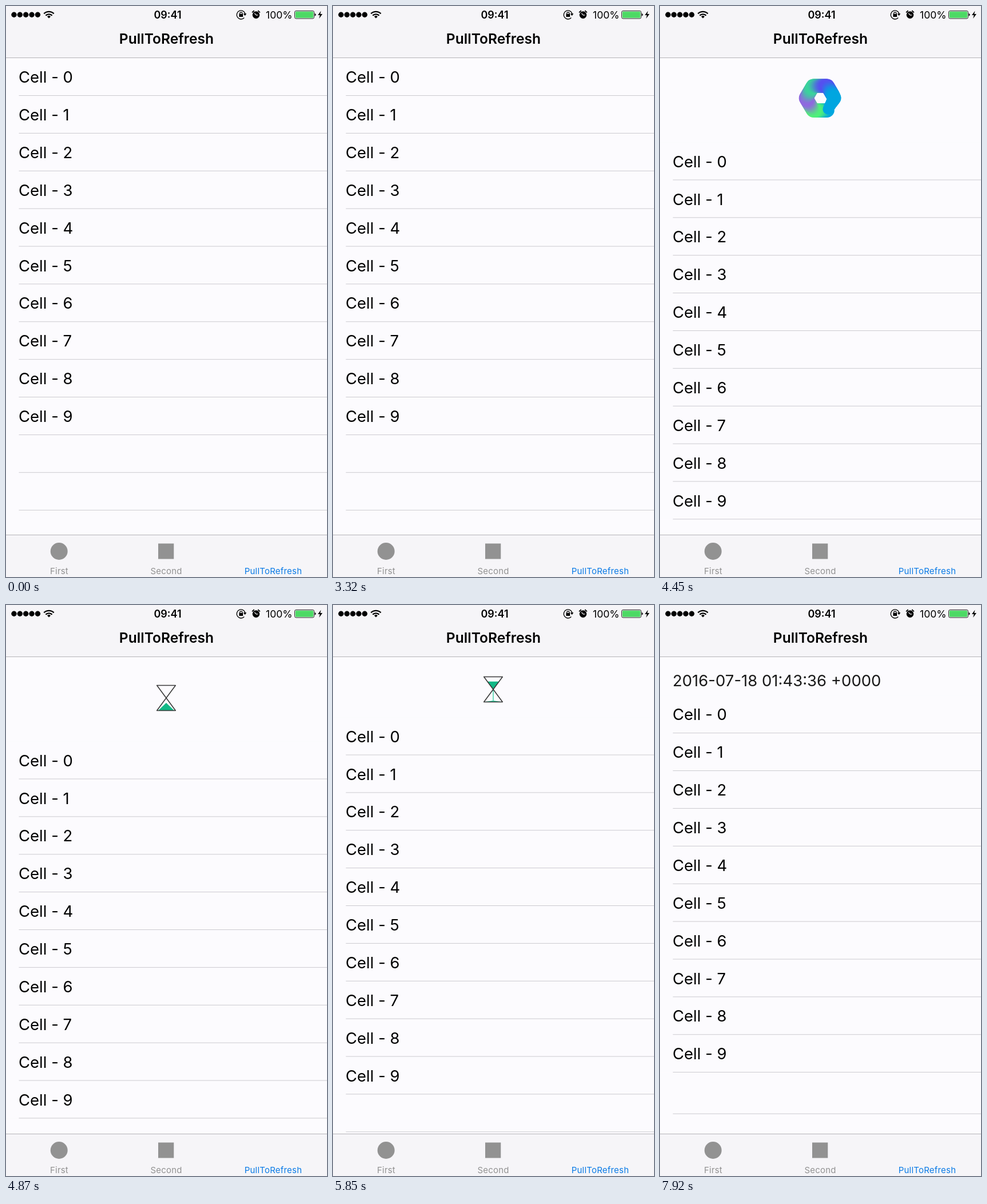
An HTML page for the animation above (8000 ms loop, 561 by 998 pixels).

```html
<!DOCTYPE html>
<html lang="en">
<head>
<meta charset="utf-8">
<title>PullToRefresh</title>
<style>
  html, body { margin: 0; width: 100%; height: 100%; overflow: hidden; background: #fcfbfe; }
  svg { display: block; width: 100vw; height: 100vh; font-family: Inter, Roboto, sans-serif; }
  .cell { font-size: 27.5px; }
  .sep { stroke: #cbcacf; stroke-width: 1; }
  .edge { stroke: #b5b4b8; stroke-width: 1; }
  .tab { font-size: 15px; letter-spacing: .2px; text-anchor: middle; fill: #929292; }
</style>
</head>
<body>
<svg viewBox="0 0 561 998">
  <rect width="561" height="998" fill="#fcfbfe"/>
  <g id="ribbon"></g>
  <g id="hourglass">
    <path id="sandTop" fill="#12b886"/>
    <path id="sandBottom" fill="#12b886"/>
    <path id="stream" stroke="#4fd6ae" stroke-width="1.6"/>
    <path d="M-16.3-22H16.3L-16.3 22H16.3Z" fill="none" stroke="#3a3a3a" stroke-width="1.6" stroke-linejoin="round"/>
  </g>
  <g id="blanks"></g>
  <g id="stamp">
    <text class="cell" x="22" y="134.2">2016-07-18 01:43:36 +0000</text>
    <line class="sep" x1="22.5" x2="561" y1="156.5" y2="156.5"/>
  </g>
  <g id="cells"><rect y="91" width="561" height="659" fill="#fcfbfe"/></g>

  <rect width="561" height="90.5" fill="#f6f5f8"/>
  <line class="edge" x2="561" y1="90.5" y2="90.5"/>
  <g id="signal"></g>
  <g fill="none" stroke="#000" stroke-width="2.3">
    <path d="M66.3 13.4a12.4 12.4 0 0 1 17.4 0M69.4 16.6a8 8 0 0 1 11.2 0"/>
    <path d="M72 18.4a4.3 4.3 0 0 1 6 0L75 21.4Z" fill="#000" stroke="none"/>
  </g>
  <text x="282.5" y="21.7" font-size="18" font-weight="600" text-anchor="middle">09:41</text>
  <g fill="none" stroke="#000" stroke-width="1.4">
    <path d="M416.3 20.5A7.5 7.5 0 1 1 418 13.5"/>
    <path d="M414.8 13.2h5.6l-2.8 4Z" fill="#000" stroke="none"/>
    <path d="M408.8 14.5v-1.6a2 2 0 0 1 4 0v1.6"/>
    <rect x="407.4" y="14" width="6.8" height="5" fill="#000" stroke="none"/>
  </g>
  <circle cx="437" cy="15.6" r="6.3"/>
  <path d="M430.6 10.8l2.6-2.3M443.4 10.8l-2.6-2.3" stroke="#000" stroke-width="1.8" stroke-linecap="round"/>
  <path d="M437 15.8h3.2M437 15.8l-2.6-3.2" fill="none" stroke="#f6f5f8" stroke-width="1.2"/>
  <text x="454" y="21.7" font-size="17.6">100%</text>
  <rect x="504.5" y="8.5" width="34" height="13.5" rx="2.4" fill="#f6f5f8" stroke="#222" stroke-width="1"/>
  <rect x="505.8" y="9.8" width="31.4" height="10.9" rx="1.2" fill="#4cd964"/>
  <path d="M539.6 12.8q2 .6 2 2.4t-2 2.4Z"/>
  <path d="M550.5 8.5L545 16h3.6l-1.4 6L553 14h-3.8Z"/>
  <text x="280.5" y="66" font-size="24.6" font-weight="600" text-anchor="middle">PullToRefresh</text>

  <rect y="924.5" width="561" height="73.5" fill="#f6f5f8"/>
  <line class="edge" x2="561" y1="924.5" y2="924.5"/>
  <circle cx="92.7" cy="953" r="15" fill="#929292"/>
  <rect x="266" y="939.5" width="27.3" height="27" fill="#929292"/>
  <text class="tab" x="93" y="993">First</text>
  <text class="tab" x="280" y="993">Second</text>
  <text class="tab" x="467" y="993" style="fill:#0b7be6">PullToRefresh</text>
</svg>
<script>
const LOOP = 8000, ROW = 65.88, REST = 105.5, PEAK = 147.5;
const PULL = 3670, HELD = 4465, RELEASE = 4900, SETTLED = 5250;
const CLOSE = 7190, CLOSE_TIME = 880, INSERT = CLOSE + 25;

const byId = id => document.getElementById(id);
const clamp = v => Math.min(1, Math.max(0, v));
const phase = (t, from, to) => clamp((t - from) / (to - from));
const mix = (a, b, k) => a + (b - a) * k;
const smooth = k => k * k * (3 - 2 * k);
const place = (el, x, y, turn = 0) =>
  el.setAttribute('transform', `translate(${x} ${y}) rotate(${turn})`);
const show = (el, on) => el.setAttribute('visibility', on ? 'visible' : 'hidden');

function add(parent, tag, attrs, text = '') {
  const el = document.createElementNS('http://www.w3.org/2000/svg', tag);
  for (const key in attrs) el.setAttribute(key, attrs[key]);
  el.textContent = text;
  return parent.appendChild(el);
}

const separator = (parent, row) => {
  const y = 156.5 + ROW * row;
  return add(parent, 'line', { class: 'sep', x1: 22.5, x2: 561, y1: y, y2: y });
};

const ribbon = byId('ribbon'), hourglass = byId('hourglass'), cells = byId('cells');
const blanks = byId('blanks'), stamp = byId('stamp');
const sandTop = byId('sandTop'), sandBottom = byId('sandBottom'), stream = byId('stream');

for (let i = 0; i < 5; i++) add(byId('signal'), 'circle', { cx: 14 + 10.35 * i, cy: 15.3, r: 4.7 });
for (let i = 0; i < 10; i++) {
  add(cells, 'text', { class: 'cell', x: 22, y: 134.2 + ROW * i }, `Cell - ${i}`);
  separator(cells, i);
}
const blankLines = [10, 11, 12].map(row => separator(blanks, row));

// Hexagonal ribbon: overlapping beads that start at the lower right corner.
const BEADS = 150;
const hues = [[0, 166, 224], [80, 240, 122], [144, 104, 224], [58, 212, 156], [86, 80, 240], [0, 166, 224], [0, 166, 224]];
const corner = i => {
  const a = (1 + i) * Math.PI / 3;
  return [25 * Math.cos(a), 25 * Math.sin(a) * .98];
};
const beads = Array.from({ length: BEADS }, (_, i) => {
  const at = i / BEADS * 6, side = Math.floor(at), k = at - side;
  const from = corner(side), to = corner(side + 1);
  const rgb = hues[side].map((c, n) => Math.round(mix(c, hues[side + 1][n], smooth(k))));
  return add(ribbon, 'circle', { cx: mix(from[0], to[0], k), cy: mix(from[1], to[1], k), fill: `rgb(${rgb})` });
});

function drawRibbon(progress) {
  const head = progress * BEADS;
  beads.forEach((bead, i) => {
    show(bead, i < head);
    bead.setAttribute('r', mix(9, 12.3, clamp((head - i) / 30)));
  });
}

function drawHourglass(t, y) {
  const local = (t - 4270) % 1500;
  const drained = clamp(local / 600);
  place(hourglass, 280, y, 180 * smooth(phase(local, 900, 1450)));
  const h = 14.8 * Math.sqrt(1 - drained), w = h * .74;
  sandTop.setAttribute('d', `M0 0L${w} ${-h}H${-w}Z`);
  sandBottom.setAttribute('d', `M0 ${21.5 - 13 * drained}L13.5 21.5H-13.5Z`);
  stream.setAttribute('d', drained < 1 ? 'M0 0V21' : '');
}

function render(t) {
  const closing = smooth(phase(t, CLOSE, CLOSE + CLOSE_TIME));
  const inserting = smooth(phase(t, INSERT, INSERT + CLOSE_TIME));
  const drag = PEAK * Math.sin(phase(t, PULL, HELD) * Math.PI / 2);
  const pull = mix(drag, REST, smooth(phase(t, RELEASE, SETTLED))) * (1 - closing);
  const iconY = 147.5 + .357 * (pull - REST);

  place(cells, 0, pull + inserting * ROW);
  place(blanks, 0, pull);
  place(stamp, 0, pull);
  stamp.setAttribute('opacity', inserting);
  show(blankLines[0], closing === 0);

  const pulling = t > PULL && t < HELD, loading = t >= HELD && t < CLOSE;
  ribbon.setAttribute('display', pulling ? 'inline' : 'none');
  hourglass.setAttribute('display', loading ? 'inline' : 'none');
  if (pulling) {
    place(ribbon, 280, iconY - 1.5);
    drawRibbon(clamp(.605 + (pull - 105) * .009));
  }
  if (loading) drawHourglass(t, iconY);
}

const start = performance.now();
function tick() {
  render((performance.now() - start) % LOOP);
  requestAnimationFrame(tick);
}
tick();
</script>
</body>
</html>
```
